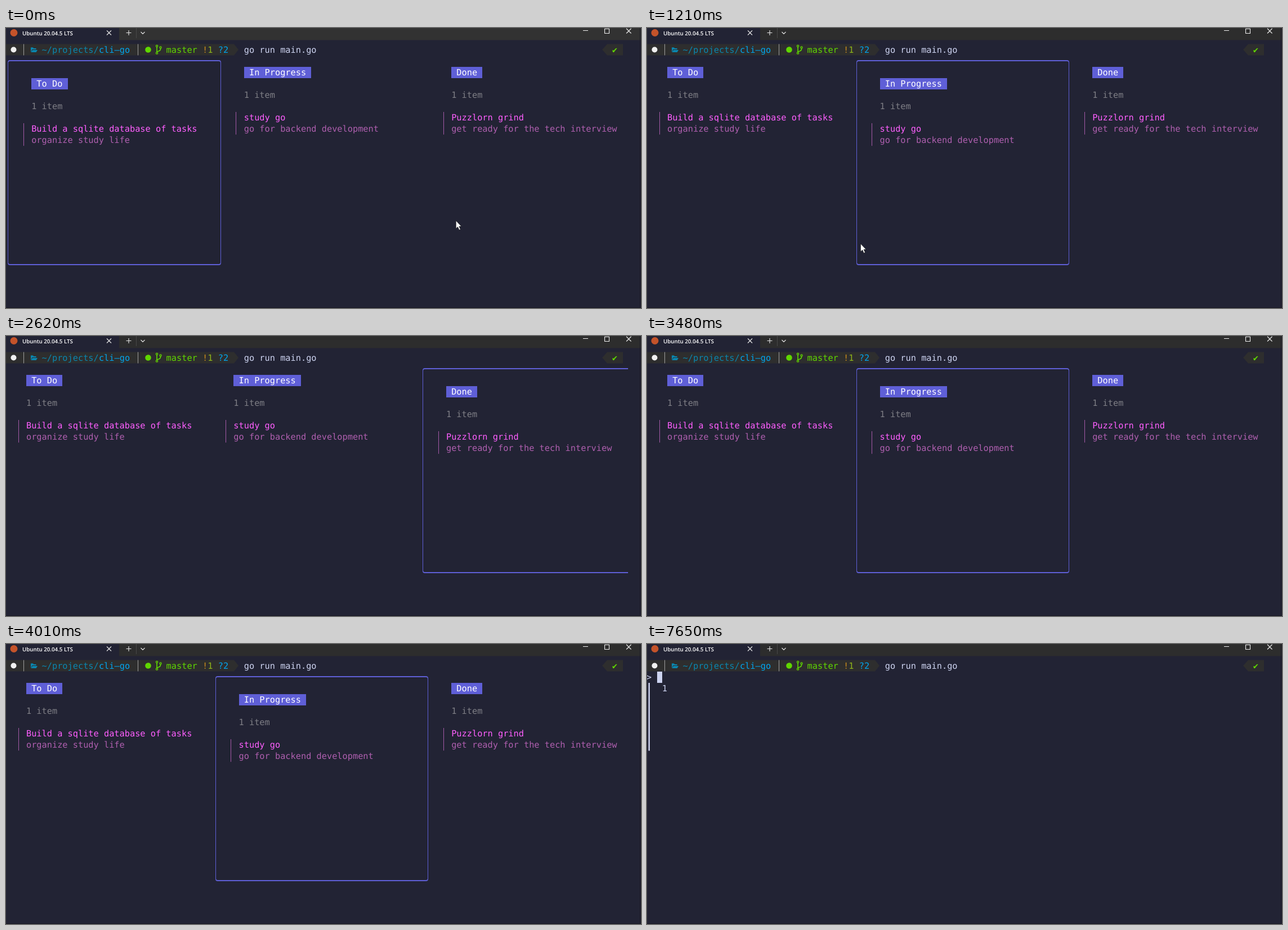
An HTML page for the animation above (8000 ms loop, 1128 by 497 pixels).

```html
<!DOCTYPE html>
<html lang="en">
<head>
<meta charset="utf-8">
<title>Terminal task board</title>
<style>
html, body { margin: 0; width: 100%; height: 100%; overflow: hidden; background: #222334; }
svg { display: block; width: 1128px; height: 497px; }
text { font: 15.298px "DejaVu Sans Mono", monospace; white-space: pre; text-rendering: geometricPrecision; }
.tab { font: 600 9.75px "Open Sans", sans-serif; }
</style>
</head>
<body>
<svg id="stage" viewBox="0 0 1128 497"></svg>
<script>
const LOOP = 8000, CELL = 9.21, ROW = 20.07;
const BG = "#222334", BAR = "#2e2e2e", INK = "#cdd3f0", ACCENT = "#5f5fd7";
const GREEN = "#5fd700", BLUE = "#00a5ef", TEAL = "#0a87b0";
const stage = document.getElementById("stage");

// Terminal grid: left edge of a column, top of a row
const cx = col => col * CELL - 0.9;
const ry = row => Math.round(28.7 + row * ROW);

const attrs = o => Object.entries(o).map(([k, v]) => `${k}="${v}"`).join(" ");
const el = (tag, o, body = "") => `<${tag} ${attrs(o)}>${body}</${tag}>`;
const rect = (x, y, width, height, fill, more = {}) => el("rect", { x, y, width, height, fill, ...more });
const path = (d, stroke, width = 1) => el("path", { d, fill: "none", stroke, "stroke-width": width });
const shape = (d, fill) => el("path", { d, fill });
const dot = (x, y, r, fill) => el("circle", { cx: x, cy: y, r, fill });
const type = (col, row, fill, str) => el("text", { x: cx(col), y: ry(row) + 15, fill }, str);

// Fills whole cells, snapped to pixels
function cells(col, row, cols, fill) {
  const x = Math.round(cx(col));
  return rect(x, ry(row), Math.round(cx(col + cols)) - x, ry(row + 1) - ry(row), fill);
}

const columns = [
  { title: "To Do", task: "Build a sqlite database of tasks", note: "organize study life", start: 4 },
  { title: "In Progress", task: "study go", note: "go for backend development", start: 44 },
  { title: "Done", task: "Puzzlorn grind", note: "get ready for the tech interview", start: 84 }
];

function titleBar() {
  return el("rect", { id: "bar", width: 1128, height: 21.5 }) +
    rect(0, 0, 201, 22, BG) +
    dot(14, 8.5, 6.5, "#c4532a") +
    el("text", { class: "tab", x: 29, y: 12.6, fill: "#fff" }, "Ubuntu 20.04.5 LTS") +
    path("M179 4.5l8 8m0-8l-8 8M213.5 8.5h9m-4.5-4.5v9M239.5 7l3.5 3.5 3.5-3.5", "#e8e8e8", 1.1) +
    path("M231.5 0v18", "#484848") +
    path("M1025 4.5h9M1063.5 1.5h8v8h-8zM1102 1l8.5 8.5m0-8.5l-8.5 8.5", "#f0f0f0", 1.1);
}

function prompt() {
  const top = 28.5, mid = top + 10, end = top + 20;
  return shape(`M0 ${top}H405L413 ${mid}L405 ${end}H0z`, BAR) +
    shape(`M1096 ${top}H1068L1059 ${mid}L1068 ${end}H1096z`, BAR) +
    path(`M31.5 ${top}V${end}M234.5 ${top}V${end}`, "#a0a0a0") +
    dot(13.5, 38.5, 5, "#f0f0f0") +
    shape("M44 43V34.5h4l1 1.5h4.5v2h-7zM47 39h9l-2.5 4h-9z", TEAL) +
    dot(252.5, 38.5, 5.3, GREEN) +
    path("M268 33v11M274.5 35.5v2q0 3-6 4.5", GREEN, 1.6) +
    [[268, 32], [268, 44.5], [274.5, 34.5]].map(([x, y]) =>
      el("circle", { cx: x, cy: y, r: 1.6, fill: BAR, stroke: GREEN, "stroke-width": 1.3 })).join("") +
    type(7, 0, TEAL, "~/projects/") + type(18, 0, BLUE, "cli–go") +
    type(31, 0, GREEN, "master") +
    type(38, 0, "#c98a1c", "!") + type(39, 0, "#8fb51a", "1") +
    type(41, 0, BLUE, "?2") + type(46, 0, INK, "go run main.go") +
    type(117, 0, GREEN, "✔");
}

// The focused column's border pushes its own text and its right neighbours
function column({ title, task, note, start }, i, focus) {
  const active = i === focus;
  const col = start + (i >= focus) + (i > focus);
  const row = active ? 3 : 2;
  return (active ? frame(col - 5) : "") +
    cells(col, row, title.length + 2, ACCENT) +
    type(col + 1, row, "#fff", title) +
    type(col, row + 2, "#7f7f86", "1 item") +
    rect(Math.floor(cx(col - 1.5)), ry(row + 4), 1, 2 * ROW, "#a55aa8") +
    type(col, row + 4, "#ff5fff", task) +
    type(col, row + 5, "#af5faf", note);
}

// Border: one pixel at the sides, two at top and bottom
function frame(col) {
  const x = Math.floor(cx(col + 0.5)), w = Math.floor(cx(col + 41.5)) + 1 - x;
  return el("g", { "clip-path": "url(#screen)" },
    rect(x, 57, w, 364, ACCENT, { rx: 4 }) + rect(x + 1, 59, w - 2, 360, BG, { rx: 3 }));
}

const board = focus => columns.map((c, i) => column(c, i, focus)).join("");

const form = () => type(0, 1, INK, "&gt;") + cells(2, 1, 1, INK) +
  rect(2.5, ry(2), 2.5, 6 * ROW, INK) + type(3, 2, INK, "1");

const views = [board(0), board(1), board(2), form()];
stage.innerHTML =
  `<clipPath id="screen">${rect(0, 0, 1105, 497, "#fff")}</clipPath>` +
  rect(0, 0, 1128, 497, BG) + titleBar() + prompt() +
  views.map(v => el("g", { class: "view" }, v)).join("") +
  path("M1126.5 0V497M0 496.5H1128", "#171722") +
  el("path", {
    id: "mouse", d: "M0 0v14l3.2-3 2.5 5.5 2.3-1-2.4-5.4h4z",
    fill: "#fff", stroke: "#111", "stroke-width": 0.6
  });

const viewEls = stage.querySelectorAll(".view");
const mouse = document.getElementById("mouse");
const bar = document.getElementById("bar");

// [time, view] and [time, x, y]; each entry holds until the next
const focusSteps = [[0, 0], [1210, 1], [1940, 2], [3480, 1], [3610, 0], [4010, 1], [4410, 0], [7650, 3]];
const mouseSteps = [
  [0, 799.3, 342], [70, 700, 351], [160, 545, 366], [250, 430, 378], [340, 379.5, 383],
  [2340, 390, 366], [2410, 418, 352], [2480, 452, 376], [2550, 470, 420], [2620, -50, -50]
];
const at = (steps, t) => steps.findLast(s => s[0] <= t);

function draw(t) {
  const view = at(focusSteps, t)[1];
  viewEls.forEach((g, i) => g.setAttribute("display", i === view ? "inline" : "none"));
  const [, x, y] = at(mouseSteps, t);
  mouse.setAttribute("transform", `translate(${x} ${y})`);
  bar.setAttribute("fill", t < 340 ? "#323232" : "#2d2d2d");
}

const began = performance.now();
function tick() {
  draw((performance.now() - began) % LOOP);
  requestAnimationFrame(tick);
}
draw(0);
requestAnimationFrame(tick);
</script>
</body>
</html>
```
